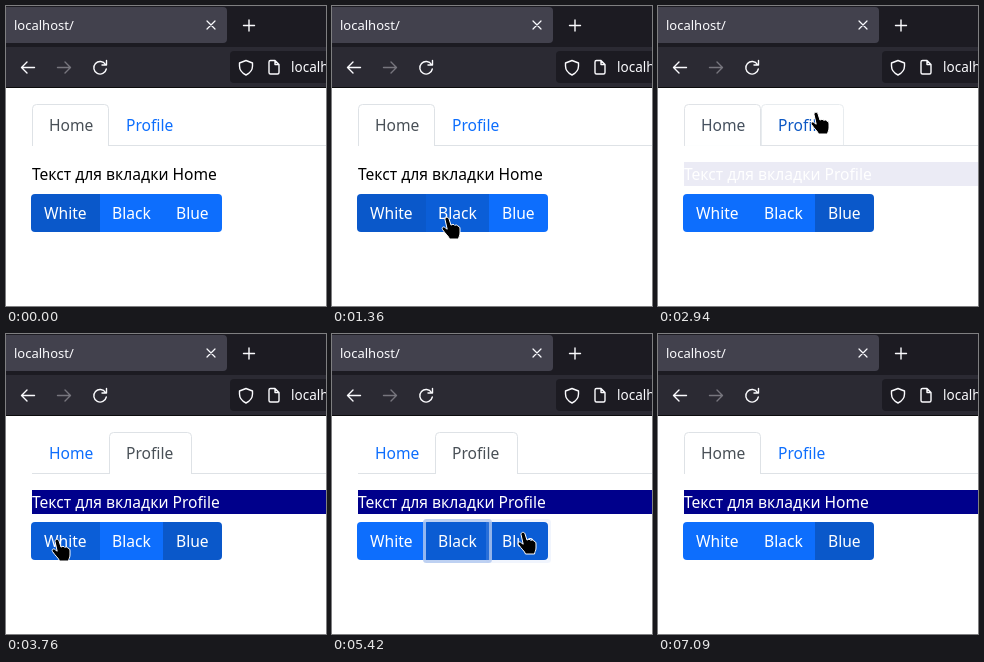
Animation, 320 px wide and 300 px high, one loop 7120 ms. Source, as an HTML page:

```html
<!DOCTYPE html>
<html lang="ru">
<head>
<meta charset="utf-8">
<title>Tabs</title>
<style>
  html, body { margin: 0; width: 100%; height: 100%; overflow: hidden; background: #fff; }
  svg { display: block; }
  text { font: 15.6px "Noto Sans", "Open Sans", sans-serif; fill: #fff; }
  .small { font-size: 13px; fill: #fbfbfe; }
  .icon { fill: none; stroke: #fbfbfe; stroke-width: 1.4; stroke-linecap: round; stroke-linejoin: round; }
  .ring { fill: none; stroke: #b0c8f0; stroke-width: 3; }
  .tab { fill: #fff; }
  .cursor { stroke: #fff; stroke-width: 1; stroke-linejoin: round; }
</style>
</head>
<body>
<svg width="320" height="300" viewBox="0 0 320 300">
  <defs><clipPath id="group"><rect x="25" y="188" width="191" height="38" rx="4"/></clipPath></defs>

  <!-- browser chrome -->
  <rect width="320" height="41" fill="#1c1b22"/>
  <rect x="-4" y="1" width="225" height="36" rx="4" fill="#42414d"/>
  <rect y="41" width="320" height="41" fill="#2b2a33"/>
  <rect y="81" width="320" height="1" fill="#0c0c0d"/>
  <rect x="224" y="45" width="110" height="32" rx="4" fill="#1c1b22"/>
  <text class="small" x="8" y="24">localhost/</text>
  <text class="small" x="285" y="66" style="font-size:13.5px">localhost</text>
  <g class="icon">
    <path d="M201 15l8 8m0-8l-8 8" stroke-width="1.2"/>
    <path d="M237.500 19.500h11m-5.500-5.500v11"/>
    <path d="M28.500 61.500h-13m5.500-5.500l-5.500 5.500 5.500 5.500"/>
    <path d="M51.500 61.500h13m-5.500-5.500l5.500 5.500-5.500 5.500" stroke="#77767e"/>
    <path d="M99.500 58.500a6.300 6.300 0 1 0 .8 4.500M100.500 54.500v4.500h-4.500"/>
    <path d="M240 54.500l6.500 2.500v3c0 4-2.500 7-6.500 9-4-2-6.500-5-6.500-9v-3z"/>
    <path d="M264.500 54.500h4.500l4 4v8a1.500 1.500 0 0 1-1.500 1.500h-7a1.500 1.500 0 0 1-1.500-1.500v-10.500a1.500 1.500 0 0 1 1.500-1.500zm4.500 0v4h4"/>
  </g>

  <!-- page -->
  <rect x="26" y="139" width="294" height="1" fill="#dee2e6"/>
  <g id="tabs"></g>
  <g id="pane">
    <rect id="paneBack" x="26" y="156" width="294" height="24"/>
    <text id="paneText" x="26" y="174"></text>
  </g>
  <g id="fills" clip-path="url(#group)"></g>
  <g id="rings"></g>
  <g id="labels"></g>

  <g id="pointer">
    <path id="hand" class="cursor" d="M-2 1.500C-2.300-.8 1.200-1.600 2 .8L4 7.200C5 6 7 6 7.800 7.500 9 6.500 10.500 7 11 8.300 12.500 8 13 9.500 13 11V15C13 18 11.500 19 11.500 21H2.500C2 18.500-2 15.500-4.500 11.500-5.800 9-3 8-1.500 10L.2 11.200Z"/>
    <path id="arrow" class="cursor" d="M0 0V16L4 12.500 7 19 9.500 18 7 11.500H12Z"/>
  </g>
</svg>
<script>
const LOOP = 7120, FADE = 150;
const $ = id => document.getElementById(id);

const tabs = [
  { name: 'Home', x: 26, w: 77, tx: 43 },
  { name: 'Profile', x: 103, w: 83, tx: 120 }
];
const buttons = [
  { name: 'White', x: 25, w: 69, tx: 38, back: '#fff', ink: '#000' },
  { name: 'Black', x: 94, w: 63, tx: 106, back: '#000', ink: '#fff' },
  { name: 'Blue', x: 157, w: 59, tx: 170, back: '#00008b', ink: '#fff' }
];

// [time, value]
const picks = [[0, 0], [1400, 1], [2100, 2], [3780, 0], [4400, 1], [5390, 2]];
const focus = [[0, -1], [1400, 1], [2100, 2], [2780, -1], [3780, 0], [4400, 1], [5390, 2], [5900, -1]];
const shown = [[0, 0], [2930, 1], [6050, 0]];
// [time, x, y]
const route = [
  [300, 325, 190], [1200, 115, 212], [1480, 115, 212], [1950, 188, 208], [2250, 188, 208],
  [2700, 158, 107], [3050, 158, 107], [3600, 51, 206], [3850, 51, 206], [4320, 127, 206],
  [4650, 127, 206], [5250, 191, 199], [5480, 191, 199], [5820, 66, 112], [6120, 66, 112], [6620, 328, 130]
];

const clamp = v => Math.max(0, Math.min(1, v));
const ease = v => v * v * (3 - 2 * v);
const at = (list, t) => list.filter(e => e[0] <= t).pop()[1];
const mix = (a, b, k) => a.map((v, i) => v + (b[i] - v) * k);
const rgb = c => `rgb(${c.map(Math.round)})`;

function pointerAt(t) {
  const i = route.findIndex(p => p[0] > t);
  if (i < 1) return [999, 999];
  const [a, b] = [route[i - 1], route[i]];
  return mix(a, b, ease((t - a[0]) / (b[0] - a[0]))).slice(1).map((v, j) => a[j + 1] + (v - a[j + 1]));
}

function over(item, top, height, t) {
  const [x, y] = pointerAt(t);
  return x >= item.x && x < item.x + item.w && y >= top && y < top + height;
}
const overTab = (tab, t) => over(tab, 98, 42, t);
const overButton = (b, t) => over(b, 188, 38, t);

// Share of the last FADE ms during which a condition held
function level(test, t) {
  let n = 0;
  for (let k = 0; k < 15; k++) n += test(Math.max(0, t - k * FADE / 15)) ? 1 : 0;
  return ease(n / 15);
}

function add(parent, tag, attrs, text = '') {
  const el = document.createElementNS('http://www.w3.org/2000/svg', tag);
  for (const k in attrs) el.setAttribute(k, attrs[k]);
  el.textContent = text;
  return $(parent).appendChild(el);
}

for (const tab of tabs) {
  tab.edge = add('tabs', 'path', {
    class: 'tab',
    d: `M${tab.x + .5} 140V102.500a4 4 0 0 1 4-4h${tab.w - 9}a4 4 0 0 1 4 4V140`
  });
  tab.base = add('tabs', 'rect', { x: tab.x, y: 139, width: tab.w, height: 1 });
  tab.label = add('tabs', 'text', { x: tab.tx, y: 125 }, tab.name);
}
for (const b of buttons) {
  b.fill = add('fills', 'rect', { x: b.x, y: 188, width: b.w, height: 38 });
  b.ring = add('rings', 'rect', { class: 'ring', x: b.x - 1.5, y: 186.5, width: b.w + 3, height: 41, rx: 2 });
  add('labels', 'text', { x: b.tx, y: 213 }, b.name);
}

const WHITE = [255, 255, 255], LINE = [222, 226, 230], SOFT = [233, 236, 239];
const LINK = [13, 110, 253], HOVER = [11, 94, 215], DARK = [10, 88, 202], GREY = [73, 80, 87];

function draw(t) {
  tabs.forEach((tab, i) => {
    const hot = level(s => overTab(tab, s), t);
    const on = level(s => at(shown, s) === i, t);
    tab.edge.style.stroke = rgb(mix(mix(WHITE, SOFT, hot), LINE, on));
    tab.base.style.fill = rgb(mix(LINE, WHITE, on));
    tab.base.setAttribute('x', tab.x + on);
    tab.base.setAttribute('width', tab.w - 2 * on);
    tab.label.style.fill = rgb(mix(mix(LINK, DARK, hot), GREY, on));
  });

  buttons.forEach((b, i) => {
    const hot = level(s => overButton(b, s), t);
    const on = level(s => at(picks, s) === i, t);
    b.fill.style.fill = rgb(mix(mix(LINK, HOVER, hot), DARK, on));
    b.ring.style.opacity = level(s => at(focus, s) === i, t);
  });

  const choice = buttons[at(picks, t)];
  $('paneBack').style.fill = choice.back;
  $('paneText').style.fill = choice.ink;
  $('paneText').textContent = 'Текст для вкладки ' + tabs[at(shown, t)].name;
  // Each switch fades the old pane out, then the new one in
  $('pane').style.opacity = Math.min(...shown.slice(1).map(e => clamp(Math.abs(t - e[0]) / FADE)));

  const [x, y] = pointerAt(t);
  const link = tabs.some(tab => overTab(tab, t)) || buttons.some(b => overButton(b, t));
  $('pointer').setAttribute('transform', `translate(${x} ${y})`);
  $('hand').style.display = link ? '' : 'none';
  $('arrow').style.display = link ? 'none' : '';
}

const start = performance.now();
function tick() {
  draw((performance.now() - start) % LOOP);
  requestAnimationFrame(tick);
}
tick();
</script>
</body>
</html>
```
